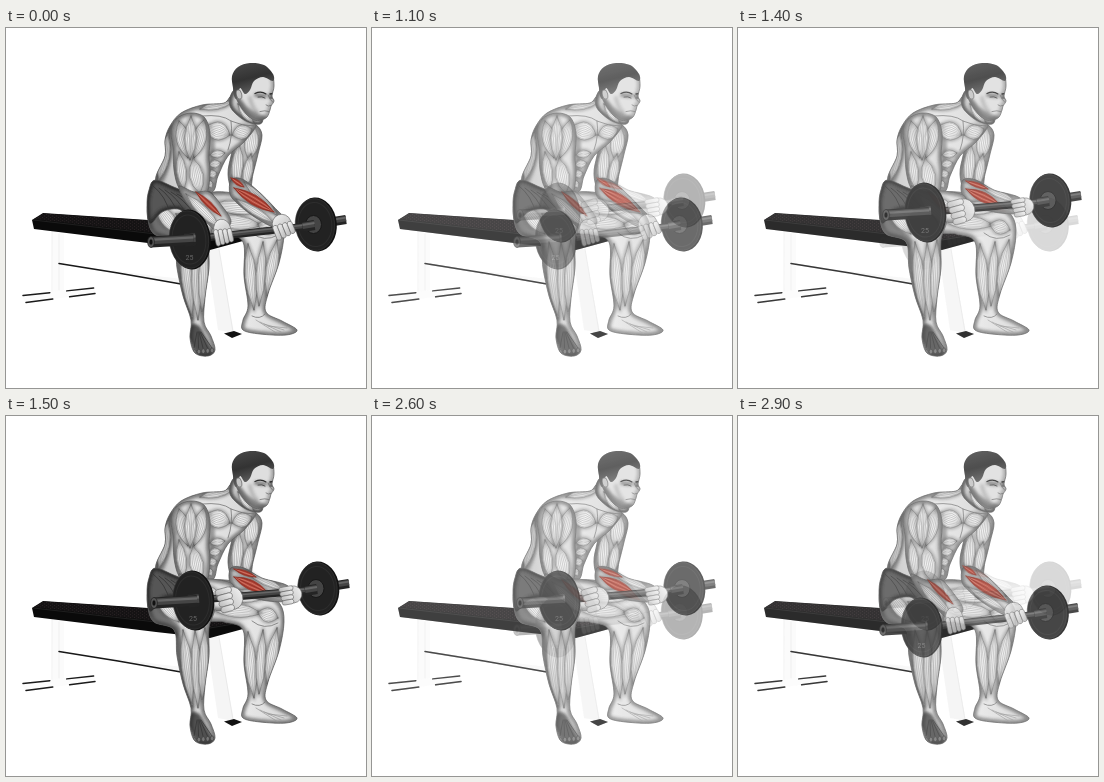
These frames come from a looping animation (360 px wide and 360 px high, 3 s). An HTML page:

```html
<!DOCTYPE html>
<html lang="en">
<head>
<meta charset="utf-8">
<title>Barbell wrist curl</title>
<style>
html, body { margin: 0; width: 100%; height: 100%; overflow: hidden; background: #fff; }
svg { display: block; width: 100%; height: 100%; }
</style>
</head>
<body>
<svg id="stage" viewBox="0 0 360 360"></svg>
<script>
let clips = 0;

const repeat = (n, f) => Array.from({ length: n }, (_, i) => f(i)).join('');
const fill = (d, color) => `<path d="${d}" fill="${color}"/>`;
const line = (d, color = '#666', w = 0.7, extra = '') =>
  `<path d="${d}" fill="none" stroke="${color}" stroke-width="${w}" stroke-linecap="round" ${extra}/>`;
const shade = (d, w = 6, o = 0.4, color = '#222') => line(d, color, w, `opacity="${o}" filter="url(#soft)"`);
const oval = (x, y, rx, ry, extra, turn = 0) =>
  `<ellipse cx="${x}" cy="${y}" rx="${rx}" ry="${ry}" transform="rotate(${turn} ${x} ${y})" ${extra}/>`;

// Smooth closed curve through a few points
function blob(points) {
  const p = points.split(' ').map(s => s.split(',').map(Number));
  const at = i => p[(i + p.length) % p.length];
  const lean = (from, a, b) => from.map((v, j) => (v + (b[j] - a[j]) / 6).toFixed(1));
  return 'M' + p[0] + repeat(p.length, i => {
    const [a, b, c, d] = [at(i - 1), at(i), at(i + 1), at(i + 2)];
    return `C${lean(b, a, c)} ${lean(c, d, b)} ${c}`;
  }) + 'Z';
}

// Body part: darkens towards its rim, everything inside is clipped
function part(points, inner = '', color = 'url(#skin)', rim = 0.5) {
  const d = blob(points), id = 'clip' + clips++;
  return `<clipPath id="${id}"><path d="${d}"/></clipPath>` + fill(d, color) +
    `<g clip-path="url(#${id})">${shade(d, 6, rim)}${inner}</g>` + line(d, '#555', 0.7);
}

const grey = { belly: 'rgba(255,255,255,.6)', fibre: '#888', edge: '#555' };
const red = { belly: '#b5483a', fibre: '#6b1a12', edge: '#8a2c20', glint: '#eaa494' };

// Spindle of fibres between two tendons, w is its half width
function muscle([x1, y1, x2, y2, w], c = grey) {
  const len = Math.hypot(x2 - x1, y2 - y1);
  const nx = (y1 - y2) / len, ny = (x2 - x1) / len;
  const curve = s => `${((x1 + x2) / 2 + nx * s).toFixed(1)} ${((y1 + y2) / 2 + ny * s).toFixed(1)}`;
  const strand = s => `M${x1} ${y1}Q${curve(s)} ${x2} ${y2}`;
  const n = Math.max(3, Math.round(w));
  const spread = i => 2 * w * (2 * (i + 0.5) / n - 1);
  const belly = `${strand(2 * w)}Q${curve(-2 * w)} ${x1} ${y1}Z`;
  return shade(belly, 2.4, 0.4) + fill(belly, c.belly) +
    repeat(n, i => line(strand(spread(i)), c.glint && i % 2 ? c.glint : c.fibre, 0.45)) +
    line(belly, c.edge, 0.5);
}
const muscles = (list, c) => list.map(m => muscle(m, c)).join('');

const bench = () =>
  fill('M46 203L58 206V262L47 265Z', '#fbfbfb') + line('M46 203V264M53 206V262', '#ebebeb') +
  fill('M15 267L87 259 90 265 20 275Z', '#fcfcfc') +
  line('M17 267.5L88 260M20 274.5L89 265.5', '#1a1a1a', 1.5, 'stroke-dasharray="27 17"') +
  fill('M60 237L176 251V256L53 236Z', '#f8f8f8') + line('M53 235.5L112 245 175 256', '#181818', 1.6) +
  fill('M200 220L213 221 228 305 212 302Z', '#f5f5f5') + line('M213 221L227 304', '#e4e4e4') +
  fill('M218 305.5L228 303 236 306 226 310Z', '#111') +
  fill('M26 192L37 185 142 192 237 205V213L204 222 150 216 28 201Z', '#0a0a0a') +
  fill('M28 191L38 185.5 142 192.5 236 205.5 204 211 150 205Z', 'url(#grain)') +
  line('M27 192L150 206 204 212 236 206.5', '#2e2e2e', 0.6);

const farLeg = () => part(
  '198,168 228,165 258,176 274,188 278,206 273,235 262,266 260,284 276,293 291,302 280,307 254,306 237,302 237,292 242,278 238,248 237,214 218,206 200,202',
  muscles([[204, 177, 260, 182, 7], [202, 191, 256, 197, 7], [252, 196, 272, 202, 7],
    [242, 216, 248, 282, 6], [257, 214, 253, 278, 5], [271, 212, 261, 268, 6]]) +
  line('M246 205Q258 215 272 207M246 288Q254 292 259 286') +
  repeat(4, i => line(`M${250 + i * 4} ${292 + i * 2}L${272 + i * 3} ${306 - i * 2}`, '#999')));

const nearLeg = () => part(
  '150,162 142,175 142,192 148,206 168,214 171,240 177,268 185,292 184,310 189,325 202,328 209,322 205,308 198,294 199,270 203,240 203,212 209,190 201,166',
  shade('M142 168Q140 195 168 214', 14, 0.55) + shade('M172 222L184 290', 8, 0.4) +
  muscles([[150, 176, 173, 206, 7], [170, 186, 198, 203, 8],
    [177, 214, 186, 288, 6], [189, 214, 192, 292, 5], [199, 212, 196, 284, 5]]) +
  shade('M188 304L199 324', 16, 0.75) +
  repeat(5, i => line(`M${191 + i} 304L${188 + i * 4.5} 320`, '#333') +
    oval(188.5 + i * 4.4, 324 - i * 0.4, 1.7, 2.4, 'fill="#777" stroke="#333" stroke-width=".5"')));

const shorts = () => part(
  '150,152 143,162 141,178 144,196 156,184 172,181 186,188 206,176 204,164 176,162',
  repeat(5, i => line(`M${147 + i * 6} ${158 + i * 2}Q${160 + i * 6} ${168 + i} ${164 + i * 8} 186`, '#333', 0.8)),
  '#565656', 0.75);

const torso = () => part(
  '227,68 218,75 196,77 175,85 164,98 159,112 159,128 150,154 176,166 205,165 212,148 222,128 238,114 250,97 240,90',
  shade('M165 100Q164 135 152 156', 8) + shade('M203 100Q208 130 200 166', 8) +
  muscles([[194, 81, 227, 74, 4], [200, 99, 224, 107, 9], [226, 107, 246, 101, 7], [162, 106, 153, 152, 6]]) +
  repeat(4, i => muscles([[204 - i, 127 + i * 10, 219 - i * 4, 125 + i * 10, 4]])) +
  line('M196 88Q216 86 225 93Q236 98 248 98M225 93Q227 108 222 122'));

const farUpperArm = () => part('240,97 250,97 256,107 252,126 247,146 243,162 227,162 222,146 225,128 230,110',
  muscles([[248, 98, 243, 132, 7], [233, 116, 230, 160, 6], [245, 126, 239, 160, 5]]));

const nearUpperArm = () => part('170,91 184,85 198,89 204,105 203,128 204,146 200,166 184,168 173,160 168,142 167,120 165,104',
  muscles([[173, 93, 182, 130, 7], [198, 92, 188, 130, 7], [185, 88, 184, 132, 6],
    [173, 124, 178, 162, 5], [187, 130, 194, 166, 7]]));

const head = () =>
  part('228,62 224,78 238,92 254,96 256,86 244,62', muscles([[232, 76, 247, 95, 4]]), 'url(#skin)', 0.7) +
  part('228,52 229,66 233,76 240,86 248,92 255,92 261,89 264,82 265,78 268,73 266,68 268,58 266,47 256,40 240,42',
    shade('M232 74Q242 88 258 92', 8, 0.45) + shade('M250 67L259 68M264 68h3', 4, 0.5) + shade('M244 70Q246 80 251 84', 4, 0.2) +
    line('M249 65.5Q255 62.5 260 66M264 66l3-.5', '#2c2c2c', 1.3) +
    line('M252 69Q256 68 259 70M264 70h2.5', '#444', 0.9) +
    line('M262 67Q264 72 267 74.5M260 77Q262 79 265 77.5M254 83.5Q259 82 263 83.5'), '#dedede', 0.3) +
  fill(blob('227,60 226,48 232,39 244,35 258,37 267,46 267,53 257,49 248,53 244,62 239,66 234,60 231,71 228,68'), 'url(#hair)') +
  oval(233, 66.5, 2.7, 4.8, 'fill="#c4c4c4" stroke="#555" stroke-width=".6"', -12);

const base = () => bench() + farLeg() + farUpperArm() + torso() + head() + nearLeg() + shorts() + nearUpperArm();

function bar([x1, y1], [x2, y2], w) {
  const coat = (o, color, k) => line(`M${x1} ${y1 - o * w}L${x2} ${y2 - o * w}`, color, w * k, 'style="stroke-linecap:butt"');
  return coat(0, '#242424', 1) + coat(0.1, '#454545', 0.6) + coat(0.2, '#666', 0.2);
}

const plate = ([x, y], rx, ry) =>
  oval(x + 0.8, y, rx, ry, 'fill="#111"', -5) +
  oval(x - 0.5, y, rx * 0.96, ry * 0.96, 'fill="#222" stroke="#3a3a3a" stroke-width=".6"', -5) +
  oval(x - 0.5, y, rx * 0.82, ry * 0.82, 'fill="none" stroke="#2d2d2d"', -5);

// near and far are plate centres; the bar runs on past both
function barbell({ near, far, tip, end }) {
  const [nx, ny] = near, [fx, fy] = far;
  return bar([fx + 12, fy - 2], end, 9) + plate(far, 20.5, 27) +
    oval(fx - 2, fy, 8, 9, 'fill="#444" stroke="#181818"') +
    bar([nx + 10, ny - 1], [fx - 6, fy + 1.5], 7.5) + bar([fx - 13, fy + 2.5], [fx - 1, fy + 0.5], 10) +
    plate(near, 20.5, 30) + bar([nx - 5, ny + 0.5], [nx + 6, ny - 0.6], 14) + bar(tip, [nx + 4, ny], 11) +
    oval(...tip, 3.4, 5.5, 'fill="#555" stroke="#222" stroke-width=".7"') + oval(...tip, 1.6, 2.8, 'fill="#111"') +
    `<text x="${nx}" y="${ny + 20}" text-anchor="middle" font-family="Roboto, sans-serif" font-size="7" fill="#666">25</text>`;
}

// Back of the hand with four fingers folded over the bar
const fist = ([x, y, w, h, turn]) =>
  `<g transform="translate(${x} ${y}) rotate(${turn})" stroke="#666" stroke-width=".6">` +
  oval(0, -h * 0.25, w * 0.95, h * 0.75, 'fill="url(#hand)"') +
  repeat(4, i => `<rect x="${w * (i / 2 - 1)}" y="${-h * (0.35 - i * 0.04)}" width="${w / 2}" height="${h * (1.2 - i * 0.07)}" rx="${w / 4}" fill="url(#hand)"/>`) +
  '</g>';

const pose = p =>
  part(p.farArm, muscles(p.farFibres)) + muscles(p.farRed, red) +
  part(p.nearArm, muscles(p.nearFibres)) + muscles(p.nearRed, red) +
  barbell(p) + p.hands.map(fist).join('');

const lowered = {
  near: [183.5, 211.5], far: [309.5, 196.5], tip: [145, 214], end: [340, 191.5],
  farArm: '225,152 236,151 252,163 268,179 277,190 269,199 250,190 232,176 224,166',
  farFibres: [[238, 154, 272, 188, 4], [230, 171, 268, 195, 4]],
  farRed: [[228, 160, 268, 184, 5], [225, 150, 238, 159, 2.5]],
  nearArm: '173,158 188,164 203,164 216,178 225,194 213,204 196,190 180,174',
  nearFibres: [[180, 166, 214, 200, 5]],
  nearRed: [[190, 164, 215, 188, 3]],
  hands: [[217, 205, 9, 14, -12], [277, 199, 10, 13, -22]]
};

const raised = {
  near: [187, 184.5], far: [312, 172.5], tip: [148, 187], end: [343, 167.5],
  farArm: '225,152 238,152 256,162 282,170 284,184 262,185 236,178 224,166',
  farFibres: [[240, 156, 278, 174, 4], [232, 174, 276, 181, 4]],
  farRed: [[228, 161, 262, 177, 5], [228, 153, 250, 161, 2.5]],
  nearArm: '173,158 190,164 206,163 228,170 216,194 198,188 180,174',
  nearFibres: [[180, 167, 216, 180, 6]],
  nearRed: [],
  hands: [[223, 183, 12, 14, 75], [284, 179, 9, 12, 80]]
};

const gradient = (id, dir, ...colors) => `<linearGradient id="${id}" ${dir}>` +
  colors.map((c, i) => `<stop offset="${i / (colors.length - 1)}" stop-color="${c}"/>`).join('') + '</linearGradient>';

document.getElementById('stage').innerHTML = `
<defs>
  ${gradient('skin', '', '#c2c2c2', '#e6e6e6', '#d4d4d4')}
  ${gradient('hand', 'x2=".4" y2="1"', '#f4f4f4', '#c0c0c0')}
  ${gradient('hair', 'x2=".3" y2="1"', '#4a4a4a', '#333', '#6a6a6a')}
  <pattern id="grain" width="4" height="3" patternUnits="userSpaceOnUse">
    <path d="M0 0h4v3h-4z" fill="#151314"/><path d="M0 .5h1M2 2h1" stroke="#302729" stroke-width=".7"/>
  </pattern>
  <filter id="soft" filterUnits="userSpaceOnUse" x="0" y="0" width="360" height="360"><feGaussianBlur stdDeviation="1.5"/></filter>
  <g id="base">${base()}</g>
</defs>
<g id="low"><use href="#base"/>${pose(lowered)}</g>
<g id="high"><use href="#base"/>${pose(raised)}</g>`;

const low = document.getElementById('low');
const high = document.getElementById('high');
let shown = -1;

// Share of the raised pose, changing in 100 ms steps of one sixth
function mix(t) {
  const step = from => (Math.floor((t - from) / 100) + 1) / 6;
  if (t < 1000) return 0;
  if (t < 1500) return step(1000);
  if (t < 2500) return 1;
  return 1 - step(2500);
}

function draw(t) {
  const k = mix(t % 3000);
  if (k === shown) return;
  shown = k;
  low.setAttribute('opacity', 1 - k);
  high.setAttribute('opacity', k);
}

const start = performance.now();
function tick() {
  draw(performance.now() - start);
  requestAnimationFrame(tick);
}
tick();
</script>
</body>
</html>
```
